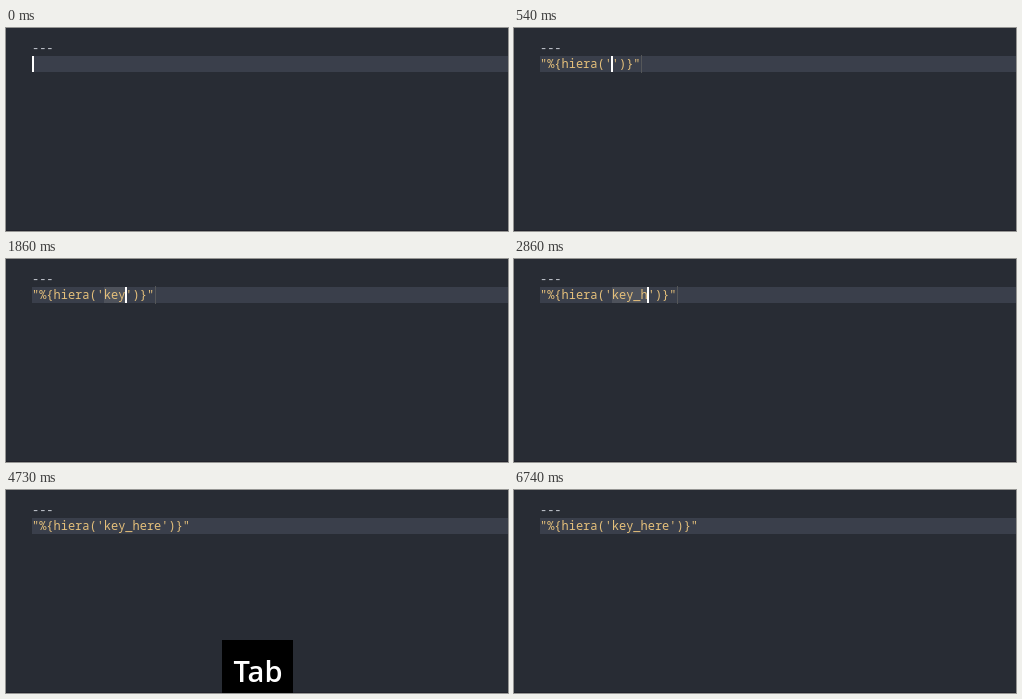
An HTML page with a canvas that plays this animation: 502 by 203 pixels, repeating every 7.07 s.

```html
<!DOCTYPE html>
<html lang="en">
<head>
<meta charset="utf-8">
<title>Snippet completion</title>
<style>
html, body { margin: 0; height: 100%; overflow: hidden; background: #282c34; }
canvas { display: block; }
</style>
</head>
<body>
<canvas id="stage" width="502" height="203"></canvas>
<script>
const ctx = document.getElementById('stage').getContext('2d');
const LOOP = 7070;
const LEFT = 26, CHAR = 7.18, LINE_TOP = 28, LINE_HEIGHT = 16;
const MONO = '11.97px "Noto Sans Mono", "DejaVu Sans Mono", monospace';
const PREFIX = '"%{hiera(\'', SUFFIX = '\')}"';

// Each entry: start time and the text present from then on.
const typedWord = [[0, ''], [70, 'l'], [240, 'lo'], [390, 'loo']];
const typedKey = [
  [540, ''], [1630, 'k'], [1780, 'ke'], [1860, 'key'], [2400, 'key_'],
  [2860, 'key_h'], [2940, 'key_he'], [3110, 'key_her'], [3180, 'key_here']
];
const INSERTED = 540, FINISHED = 4190;
const caretHidden = [[1080, 1630], [2330, 2400], [3640, 4190], [4730, 5210], [5760, 6210], [6740, LOOP]];
const tabShown = [[620, 1460], [4270, 5110]];

const latest = (steps, t) => steps.filter(([start]) => start <= t).pop()[1];
const within = (spans, t) => spans.some(([start, end]) => t >= start && t < end);
const columnX = column => Math.floor(LEFT + column * CHAR);

function rect(x, y, w, h, color) {
  ctx.fillStyle = color;
  ctx.fillRect(x, y, w, h);
}

function text(string, x, y, color, weight = 500) {
  ctx.font = `${weight} ${MONO}`;
  ctx.fillStyle = color;
  ctx.fillText(string, x, y);
}

function drawPopup(word) {
  const x = columnX(word.length), y = LINE_TOP + LINE_HEIGHT;
  rect(x, y, 430, 16, '#181a1f');
  rect(x + 1, y + 1, 428, 14, '#2c313a');

  // Snippet icon: solid top and sides, dotted bottom
  const iconX = x + 8, iconY = y + 3, iconColor = '#c5c5c5';
  rect(iconX, iconY, 12, 1, iconColor);
  rect(iconX, iconY, 1, 11, iconColor);
  rect(iconX + 11, iconY, 1, 11, iconColor);
  for (let i = 0; i < 12; i += 2) rect(iconX + i, iconY + 11, 1, 1, iconColor);

  text(word, x + 25, 57, '#e4e6ea', 700);
  text('lookup'.slice(word.length), x + 25 + word.length * CHAR, 57, '#b4b9c2');
  text('Hiera Lookup (User Snippet)', x + 208, 57, '#8b9099');

  ctx.fillStyle = '#1b80b2';
  ctx.beginPath();
  ctx.arc(x + 411.5, 53.5, 4.7, 0, Math.PI * 2);
  ctx.fill();
  rect(x + 411, 51, 1, 1, '#d5e6ef');
  rect(x + 411, 53, 1, 3, '#d5e6ef');
}

function drawTabKey() {
  rect(216, 150, 71, 53, '#000');
  ctx.font = '600 29px "Open Sans", "Noto Sans", sans-serif';
  ctx.fillStyle = '#fff';
  ctx.textAlign = 'center';
  ctx.fillText('Tab', 252, 192);
  ctx.textAlign = 'left';
}

function draw(t) {
  rect(0, 0, 502, 203, '#282c34');
  rect(0, 202, 502, 1, '#21222b');
  rect(LEFT, LINE_TOP, 476, LINE_HEIGHT, '#3a3f4b');
  text('---', LEFT, 24, '#c3c7cf');

  let content, caret;
  if (t < INSERTED) {
    content = latest(typedWord, t);
    caret = content.length;
  } else {
    const key = latest(typedKey, t);
    content = PREFIX + key + SUFFIX;
    caret = t < FINISHED ? PREFIX.length + key.length : content.length;
    if (t < FINISHED) {
      const start = columnX(PREFIX.length) + 1;
      rect(start, LINE_TOP, Math.max(1, columnX(caret) + 1 - start), LINE_HEIGHT, '#4e525b');
      rect(columnX(content.length) + 1, 27, 1, 18, '#555759');
    }
  }
  text(content, LEFT, 40, '#e5c07b');
  if (!within(caretHidden, t)) rect(columnX(caret), LINE_TOP, 2, LINE_HEIGHT, '#fff');
  if (t >= 70 && t < INSERTED) drawPopup(content);
  if (within(tabShown, t)) drawTabKey();
}

function frame() {
  draw(performance.now() % LOOP);
  requestAnimationFrame(frame);
}
frame();
</script>
</body>
</html>
```
